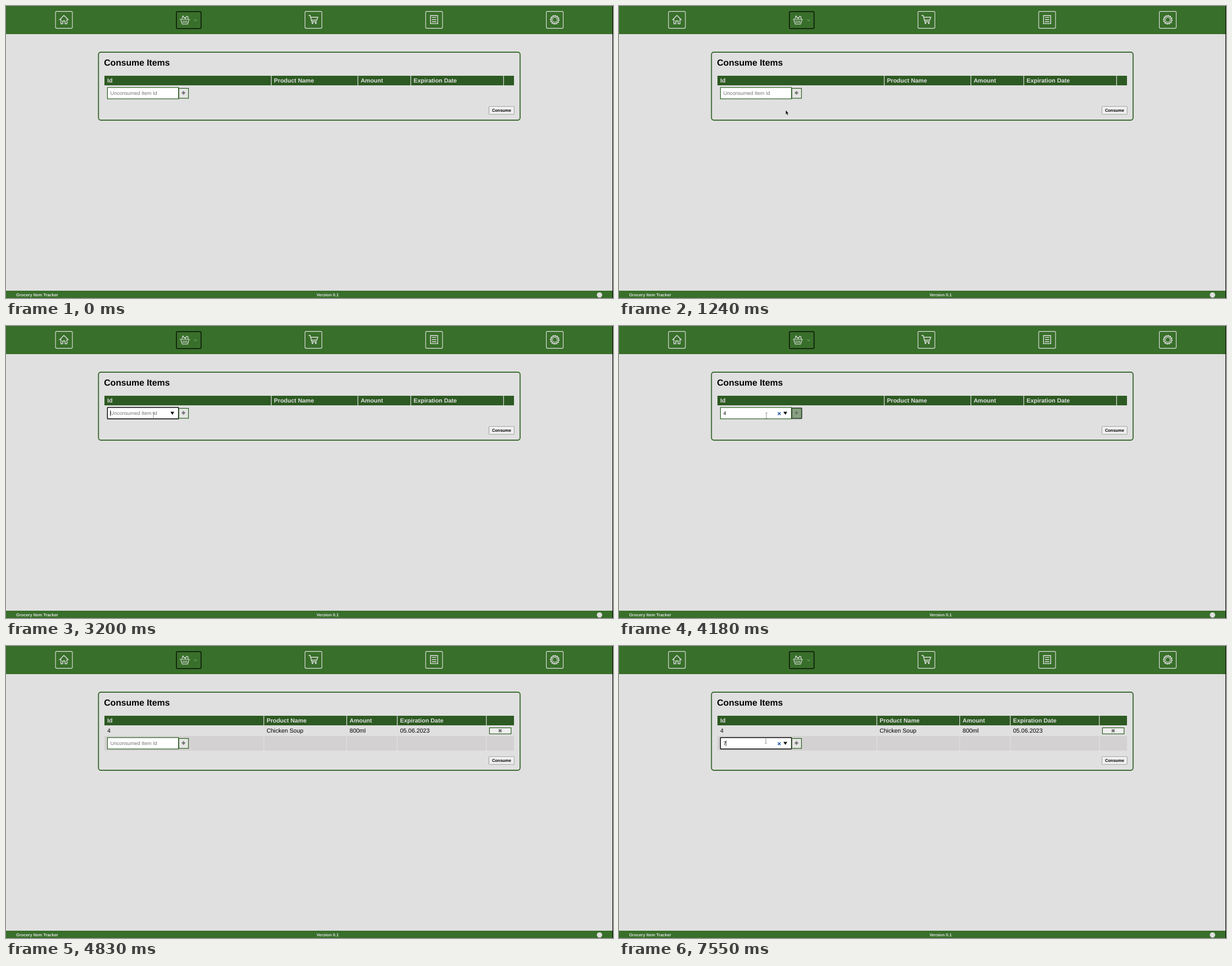
An HTML page for the animation above (8 s loop, 1079 by 519 pixels).

```html
<!DOCTYPE html>
<html lang="en">
<head>
<meta charset="utf-8">
<title>Consume Items</title>
<style>
  html, body { margin: 0; width: 100%; height: 100%; overflow: hidden; background: #e0e0e0; }
  svg { display: block; width: 100vw; height: 100vh; }
  text { font-family: "Liberation Sans", Arial, sans-serif; font-size: 10.5px; text-rendering: geometricPrecision; }
  .bold { font-weight: bold; }
  .title { font-size: 15.73px; }
  .th { fill: #e0e0e0; font-weight: bold; }
  .small { font-size: 7.48px; font-weight: bold; }
  .field { font-size: 9px; }
  .hint { fill: #757575; }
  .bar { fill: #386f2a; }
  .head { fill: #2d5a22; }
  .frame { fill: none; stroke: #2d5f22; stroke-width: 1.7; }
  .edge { stroke: #2d5f22; stroke-width: 1.2; }
  .gap { fill: none; stroke: #e0e0e0; stroke-width: 1.2; }
  .icon { fill: none; stroke: #e0e0e0; stroke-width: 1.4; }
  .thin { stroke-width: 1.15; }

  /* One 8 s clock; every change is a hard step. */
  .anim { animation: 8s step-end infinite; }
  .before { animation-name: before; }
  .after { animation-name: after; }
  .shift { animation-name: shift; }
  .arrow { animation-name: arrow; }
  .focus { animation-name: focus; }
  .caret { animation-name: caret; }
  .empty { animation-name: empty; }
  .filled { animation-name: filled; }
  .first { animation-name: first; }
  .second { animation-name: second; }
  .press { animation-name: press; }
  .beam { animation-name: beam; }
  .pointer { animation-name: pointer; }

  @keyframes before { 0% { opacity: 1 } 60.375%, 100% { opacity: 0 } }
  @keyframes after { 0% { opacity: 0 } 60.375%, 100% { opacity: 1 } }
  @keyframes shift { 0% { transform: none } 60.375%, 100% { transform: translateY(18px) } }
  @keyframes arrow { 0%, 60.375% { opacity: 0 } 19.375%, 73.875%, 100% { opacity: 1 } }
  @keyframes focus { 0%, 52.25% { opacity: 0 } 24.5%, 76.875%, 100% { opacity: 1 } }
  @keyframes empty { 0%, 60.375% { opacity: 1 } 45.125%, 94.375%, 100% { opacity: 0 } }
  @keyframes filled { 0%, 60.375% { opacity: 0 } 45.125%, 94.375%, 100% { opacity: 1 } }
  @keyframes first { 0%, 60.375%, 100% { opacity: 0 } 45.125% { opacity: 1 } }
  @keyframes second { 0% { opacity: 0 } 94.375%, 100% { opacity: 1 } }
  @keyframes press { 0%, 60.375%, 100% { opacity: 0 } 52.25% { opacity: .5 } 53.375% { opacity: 1 } }
  @keyframes caret {
    0%, 31.75%, 52.25%, 84.125% { opacity: 0; transform: none }
    24.5%, 40%, 76.875%, 91.375% { opacity: 1; transform: none }
    45.125%, 94.375%, 100% { opacity: 1; transform: translateX(4.7px) }
  }
  @keyframes beam {
    0% { opacity: 0; transform: translate(265px, 161px) }
    19.375% { opacity: 1; transform: translate(265px, 161px) }
    20.375% { opacity: 1; transform: translate(262px, 159.5px) }
    58.5% { opacity: 0; transform: translate(262px, 159.5px) }
    76.875%, 100% { opacity: 1; transform: translate(261px, 168px) }
  }
  @keyframes pointer {
    0% { opacity: 0; transform: translate(671px, 269px) }
    4.25% { opacity: 1; transform: translate(671px, 269px) }
    5.375% { opacity: 1; transform: translate(557px, 262px) }
    8.5% { opacity: 1; transform: translate(505px, 247px) }
    9.5% { opacity: 1; transform: translate(435px, 226px) }
    10.5% { opacity: 1; transform: translate(372px, 208px) }
    11.375% { opacity: 1; transform: translate(328px, 195px) }
    12.375% { opacity: 1; transform: translate(305px, 188px) }
    13.375% { opacity: 1; transform: translate(297px, 186px) }
    15.5% { opacity: 1; transform: translate(296px, 185px) }
    16.5% { opacity: 1; transform: translate(290px, 180px) }
    17.5% { opacity: 1; transform: translate(281px, 173px) }
    18.375% { opacity: 1; transform: translate(272px, 167px) }
    19.375%, 100% { opacity: 0; transform: translate(265px, 161px) }
  }
</style>
</head>
<body>
<svg viewBox="0 0 1079 519" xmlns="http://www.w3.org/2000/svg">
  <rect width="1079" height="519" fill="#e0e0e0"/>
  <rect class="bar" width="1079" height="50"/>
  <rect class="bar" y="506" width="1079" height="13"/>

  <!-- Navigation -->
  <g class="icon thin">
    <rect x="88" y="9.6" width="30" height="30" rx="2"/>
    <rect x="531.5" y="9.6" width="30" height="30" rx="2"/>
    <rect x="746" y="9.6" width="30" height="30" rx="2"/>
    <rect x="960.5" y="9.6" width="30" height="30" rx="2"/>
  </g>
  <rect x="302.9" y="9.9" width="43.8" height="30.4" rx="2" fill="none" stroke="#0b1408" stroke-width="1.5"/>
  <path class="icon" d="M94.8 25 103 16.8 111.2 25M97.6 23.5V31.6H101V26.5H105V31.6H108.4V23.5"/>
  <g class="icon thin">
    <path d="M309 23.7H327M310.8 24.5 313.2 32.2H322.8L325.2 24.5M315 26V30.5M318 26V30.5M321 26V30.5"/>
    <path d="M312.5 23 315 18.5 318 22M313 18.5 315.5 17.5M318.5 23 321 18.2 323.5 19V23M316.5 20.5H320"/>
    <path d="M334.3 24 336.9 26.4 339.5 24" stroke="#9db996" stroke-width="1"/>
  </g>
  <g class="icon">
    <path d="M537.8 16.8H540.6L543.6 28H552.6M541.5 20H554.2L552.2 25.2H543"/>
    <circle cx="544.8" cy="30.6" r=".8"/>
    <circle cx="550.6" cy="30.6" r=".8"/>
    <path d="M754.6 17H767.4V31.4H754.6ZM757.2 20.4H764.8M757.2 24.2H764.8M757.2 28H764.8"/>
    <circle cx="975.5" cy="24.5" r="6.7"/>
    <circle cx="975.5" cy="24.5" r="4.3" stroke-width="1.1"/>
    <circle cx="975.5" cy="24.5" r="7.9" stroke-width="1.4" pathLength="24" stroke-dasharray="1"/>
  </g>

  <!-- Footer -->
  <g fill="#e0e0e0">
    <text class="small" x="18" y="515.7">Grocery Item Tracker</text>
    <text class="small" x="552" y="515.7">Version 0.1</text>
    <circle cx="1055" cy="513.6" r="4.7"/>
  </g>
  <rect x="1078" width="1" height="519"/>

  <text class="bold title" x="174.2" y="106.2">Consume Items</text>
  <rect class="head" x="175" y="124" width="728" height="17"/>
  <text class="th" x="180" y="136">Id</text>

  <!-- Table without items -->
  <g class="anim before">
    <rect class="frame" x="164.4" y="82.2" width="749.4" height="120.6" rx="4"/>
    <path class="gap" d="M471.5 124v17M625.5 124v17M719.5 124v17M884.5 124v17"/>
    <text class="th" x="476.3" y="136">Product Name</text>
    <text class="th" x="630.5" y="136">Amount</text>
    <text class="th" x="724.4" y="136">Expiration Date</text>
  </g>

  <!-- Table with one item -->
  <g class="anim after">
    <rect class="frame" x="164.4" y="82.2" width="749.4" height="138.6" rx="4"/>
    <rect x="175" y="160" width="728" height="26" fill="#d4d1d2"/>
    <path class="gap" d="M458.3 124v62M605.6 124v62M695.5 124v62M853.8 124v62"/>
    <text class="th" x="463.2" y="136">Product Name</text>
    <text class="th" x="610.8" y="136">Amount</text>
    <text class="th" x="700.5" y="136">Expiration Date</text>
    <text x="180" y="154">4</text>
    <text x="463.2" y="154">Chicken Soup</text>
    <text x="610.8" y="154">800ml</text>
    <text x="700.5" y="154">05.06.2023</text>
    <rect class="edge" x="859.4" y="145.4" width="38.4" height="10.8" fill="#efefef"/>
    <path d="M876 148.2 880.8 153M880.8 148.2 876 153" stroke="#6c706a" stroke-width="2.2"/>
  </g>

  <!-- Entry row -->
  <g class="anim shift">
    <rect class="edge" x="180.4" y="144.8" width="126.2" height="20.2" fill="#fff"/>
    <rect class="anim focus" x="180.4" y="144.8" width="126.2" height="20.2" rx="1" fill="#fff" stroke="#101010" stroke-width="1.4"/>
    <text class="field hint anim empty" x="185.4" y="157.8">Unconsumed Item Id</text>
    <text class="field anim first" x="185.4" y="157.8">4</text>
    <text class="field anim second" x="185.4" y="157.8">7</text>
    <rect class="anim caret" x="185.1" y="150" width=".8" height="10"/>
    <path class="anim filled" d="M282.4 153.4 287.2 158.2M287.2 153.4 282.4 158.2" stroke="#2a5fa8" stroke-width="1.6"/>
    <path class="anim arrow" d="M292.4 152.6H299L295.7 157.8Z"/>

    <rect class="edge" x="307.2" y="146.4" width="17.2" height="17.6" fill="#e6e6e6"/>
    <path d="M315.5 151.2V157.4M312.4 154.3H318.6" stroke="#71756f" stroke-width="2.2"/>
    <g class="anim press">
      <rect x="307" y="145.4" width="18.2" height="19.4" rx="1.5" fill="#2d5a22" stroke="#0b0f0a" stroke-width="1.4"/>
      <path d="M315.5 151.2V157.4M312.4 154.3H318.6" stroke="#5d7856" stroke-width="2.2"/>
    </g>

    <rect x="858.5" y="178.4" width="44.8" height="14.2" rx="1.2" fill="#efefef" stroke="#8c8c8c" stroke-width=".8"/>
    <text class="small" x="863.9" y="188.1">Consume</text>
  </g>

  <!-- Mouse -->
  <path class="anim beam" d="M-2-5H-.6L0-4.5.6-5H2M0-4.5V4.5M-2 5H-.6L0 4.5.6 5H2" fill="none" stroke="#666" stroke-width=".7"/>
  <path class="anim pointer" d="M.4.3V7.6L2 6.2 3.3 9.2 4.5 8.7 3.3 5.8H5.4Z" stroke="#fff" stroke-width=".3"/>
</svg>
</body>
</html>
```
